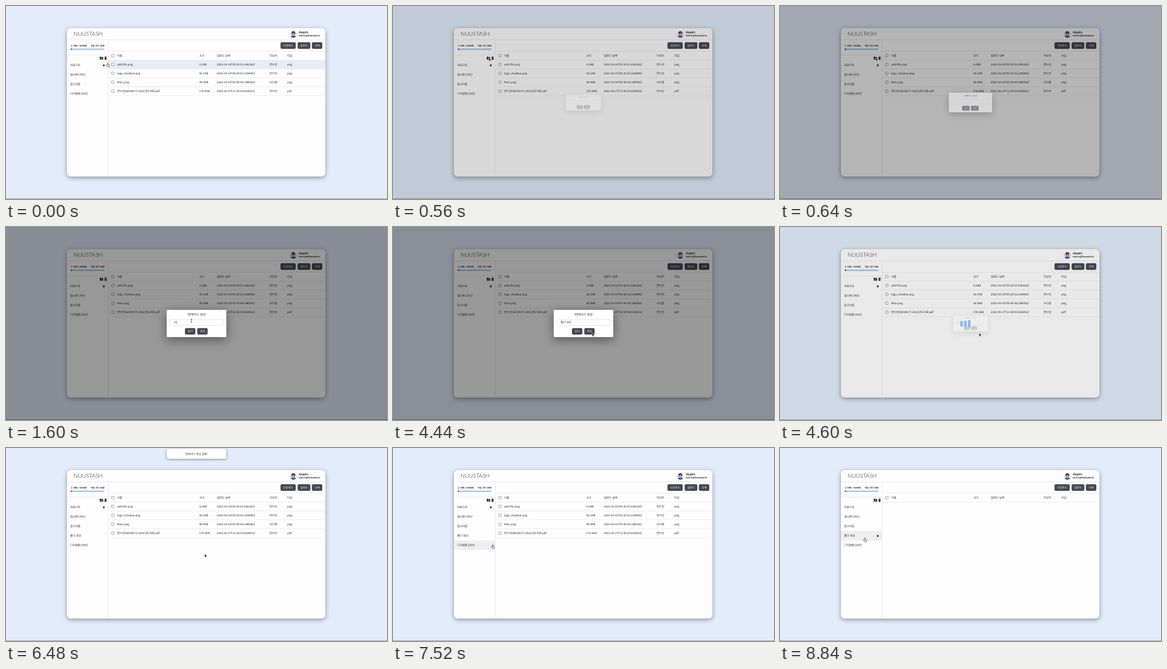
An HTML page that plays this animation: 600x305 px, repeating every 9240 ms.

```html
<!DOCTYPE html>
<html lang="ko">
<head>
<meta charset="utf-8">
<title>Cloud storage</title>
<style>
html, body { margin: 0; height: 100%; overflow: hidden; background: #e2ecfb; }
svg { display: block; width: 100vw; height: 100vh; }
text { font-family: "Noto Sans CJK KR", "Noto Sans", sans-serif; fill: #222; text-rendering: geometricPrecision; white-space: pre; }
.mid { text-anchor: middle; }
.end { text-anchor: end; }
.bold { font-weight: 700; }
.white { fill: #fff; }
.logo { font-family: Lato, sans-serif; font-weight: 300; }
.card { filter: drop-shadow(0 2px 3.5px rgba(0, 0, 0, .38)); }
.modal { filter: drop-shadow(0 4px 8px rgba(0, 0, 0, .45)); }
.toast { filter: drop-shadow(0 1px 2px rgba(0, 0, 0, .4)); }
</style>
</head>
<body>
<svg id="stage" viewBox="0 0 600 305" preserveAspectRatio="none"></svg>
<script>
const LOOP = 9240, DARK = '#474753', LINE = '#e3e4e8';
const stage = document.getElementById('stage');

// Markup helpers; text is placed by its vertical centre.
const box = (x, y, w, h, fill, r = 0, more = '') =>
  `<rect x="${x}" y="${y}" width="${w}" height="${h}" rx="${r}" fill="${fill}" ${more}/>`;
const label = (x, cy, size, str, cls = '', more = '') =>
  `<text x="${x}" y="${cy + size * .36}" font-size="${size}" class="${cls}" ${more}>${str}</text>`;
const button = (x, y, w, h, str) =>
  box(x, y, w, h, DARK, 2) + label(x + w / 2, y + h / 2, 4.2, str, 'mid white');
const group = (id, inner, more = '') => `<g id="${id}" ${more}>${inner}</g>`;
const path = (d, fill, more = '') => `<path d="${d}" fill="${fill}" ${more}/>`;

const columns = [175, 304.5, 332, 415, 443];
const checkbox = y => box(166.3, y - 2, 4, 4, '#fff', .6, 'stroke="#777" stroke-width=".6"');
const cells = (y, row) => checkbox(y) + row.map((s, i) => label(columns[i], y, 4.35, s)).join('');
const files = [
  ['add-file.png', '6.2KB', '2022-03-16T05:20:51.656162Z', '한누빈', 'png'],
  ['logo_shadow.png', '82.1KB', '2022-03-16T05:20:52.224895Z', '한누빈', 'png'],
  ['Main.png', '80.9KB', '2022-03-16T05:40:48.188592Z', '오다결', 'png'],
  ['한누빈(8203417)-2021년도자료.pdf', '176.5KB', '2022-06-27T11:58:50.663851Z', '한누빈', 'pdf']
];
const fileRows = files.map((f, i) =>
  cells(92.3 + 14.1 * i, f) + box(161, 99.3 + 14.1 * i, 342, .6, LINE)).join('');

const avatar = '<clipPath id="round"><circle cx="452.5" cy="44.5" r="5.7"/></clipPath>' +
  '<g clip-path="url(#round)">' + box(446, 38, 13, 13, '#e4e5ef') +
  '<ellipse cx="452.5" cy="50" rx="4.4" ry="3.4" fill="#3c5fb0"/>' +
  '<circle cx="452.5" cy="43" r="2.9" fill="#33283a"/>' +
  '<circle cx="452.5" cy="44.2" r="2" fill="#e39a72"/></g>';

const card =
  box(96, 35, 407, 234.5, '#fdfdfe', 6, 'class="card"') +
  label(106.5, 44.2, 8.8, 'NUUSTASH', 'logo') + avatar +
  label(461, 41.3, 4.4, 'dapple', 'bold') +
  label(461, 46.8, 3.5, 'tobrin@Example.kr', 'bold') +
  box(96, 53, 407, .7, LINE) + box(160.6, 53, .7, 216.5, LINE) +
  box(96, 77, 65, .6, LINE) + box(161, 71, 342, .6, LINE) + box(161, 85.2, 342, .6, LINE) +
  label(102.3, 62.5, 3.4, '2.7MB / 400MB', 'bold') +
  label(155, 62.5, 3.4, '여유 397.3MB', 'bold end') +
  box(102, 67.3, 53, 2.3, '#a3c8ee', 1.1) + box(102, 67.3, 2, 2.3, '#3f4a60', 1) +
  button(432.3, 57.3, 24, 10.4, '다운로드') + button(459.3, 57.3, 20, 10.4, '업로드') +
  button(481.7, 57.3, 16.4, 10.4, '삭제') +
  path('M147.6 80h2l.7.8h2.8v4h-5.5z', '#333') + path('M150.4 82.2v1.8m-.9-.9h1.8', 'none', 'stroke="#fff" stroke-width=".5"') +
  path('M155 80.2h1l.3-.5h1l.3.5h1v.7h-3.6zM155.3 81.3h3v3.6h-3z', '#333') +
  group('rowHover', box(161, 85.8, 342, 13.5, '#e7ecf6')) +
  cells(78.4, ['이름', '크기', '업로드 날짜', '작성자', '타입']) +
  group('files', fileRows) +
  box(96, 131.2, 65, 15, '#efeff2', 0, 'id="sideHover"') +
  ['자료구조', '캡스톤디자인', '알고리즘'].map((s, i) => label(101, 93.7 + 15 * i, 4.35, s)).join('') +
  group('newFolder', label(101, 138.7, 4.35, '폴더 생성')) +
  group('lastFolder', label(101, 138.7, 4.35, '디지털통신보안')) +
  group('gear', '<circle r="1.2" fill="#333"/><circle r="1.5" fill="none" stroke="#333" stroke-width=".7" stroke-dasharray=".7 .48"/>');

const modal = box(253, 131, 94, 43, '#fff', 1.5, 'class="modal"') +
  label(300, 138, 4.9, '컨테이너 생성', 'mid') +
  box(258, 146, 84, 9.6, '#fff', .8, 'stroke="#d5d5da" stroke-width=".6"') +
  label(264, 150.8, 4.2, '', '', 'id="typed"') +
  box(0, 148.6, .5, 4.6, '#222', 0, 'id="caret"') +
  button(281.8, 159.8, 16.4, 10.2, '닫기') + button(301.2, 159.8, 16.4, 10.2, '생성');

const edge = 'stroke="#fff" stroke-width=".5" stroke-linejoin="round"';
const cursors =
  group('arrow', path('M0 0v5.2l1.2-1.1.8 1.8.9-.4-.8-1.7h1.7z', '#000', edge)) +
  group('hand', path('M-.6.4q.6-.8 1.2 0v2l2 .5q.6.2.5.9l-.5 2h-3.1l-1.7-2.1q.1-.8.9-.4l.7.5z', '#fff', 'stroke="#111" stroke-width=".55" stroke-linejoin="round"')) +
  group('beam', path('M-1-2.6q1 0 1 .6 0-.6 1-.6M0-2v4M-1 2.6q1 0 1-.6 0 .6 1 .6', 'none', 'stroke="#111" stroke-width=".6"'));

stage.innerHTML = box(0, 0, 600, 305, '#e2ecfb') + box(0, 304, 600, 1, '#a4a8b0') + card +
  box(0, 0, 600, 305, '#000', 0, 'id="shade"') + group('modal', modal) +
  group('loader', [284, 290, 296].map(x => box(x, 145, 4, 16, '#8ab8e8')).join('')) +
  group('toast', box(253, 1, 94, 16, '#fff', 4, 'class="toast"') + label(300, 9, 4.3, '컨테이너 생성 완료!', 'mid')) +
  group('cursor', cursors);

const el = {};
stage.querySelectorAll('[id]').forEach(n => el[n.id] = n);
const bars = [...el.loader.children];

const ramp = (t, a, b) => Math.min(1, Math.max(0, (t - a) / (b - a)));
const smooth = k => k * k * (3 - 2 * k);
const easeOut = k => 1 - (1 - k) ** 2;
const show = (id, on) => el[id].style.display = on ? '' : 'none';
const move = (id, x, y) => el[id].setAttribute('transform', `translate(${x} ${y})`);

// Pointer stops: time, x, y
const stops = [[40, 160, 90], [240, 151, 82], [700, 151, 82], [1400, 292, 148], [3880, 292, 148],
  [4200, 313.6, 167.5], [6440, 313.6, 167.5], [7440, 164, 156], [7700, 133.6, 142]];
function pointer(t) {
  let [, x, y] = stops[0];
  for (let i = 1; i < stops.length; i++) {
    const [a] = stops[i - 1], [b, nx, ny] = stops[i], k = smooth(ramp(t, a, b));
    x += (nx - x) * k;
    y += (ny - y) * k;
  }
  return [x, y];
}

// Syllables as they compose in the input
const keys = [[1400, ''], [1560, 'ㅍ'], [1840, '포'], [2040, '폴'], [2240, '폴ㄷ'], [2480, '폴더'], [2720, '폴더 '],
  [2840, '폴더 ㅅ'], [3000, '폴더 새'], [3120, '폴더 생'], [3280, '폴더 생ㅅ'], [3440, '폴더 생서'], [3600, '폴더 생성']];

function drawModal(t) {
  const opening = t < 2000;
  const k = opening ? ramp(t, 500, 800) : 1 - ramp(t, 4440, 4640);
  el.shade.setAttribute('opacity', .4 * (opening ? easeOut(k) : k));
  show('modal', k > 0);
  el.modal.setAttribute('opacity', k);
  el.modal.setAttribute('transform', `translate(300 152.5) scale(${.48 + .52 * k}) translate(-300 -152.5)`);

  const [since, str] = keys.findLast(([at]) => t >= at) || [t, ''];
  el.typed.textContent = str;
  el.caret.setAttribute('x', 264.3 + [...str].reduce((w, c) => w + (c === ' ' ? .95 : 3.86), 0));
  show('caret', t >= 1400 && (t - since) % 1000 < 500);
}

function drawLoader(t) {
  show('loader', t >= 4450 && t < 6120);
  bars.forEach((bar, i) => {
    const phase = (t - 4450 + 240 - 120 * i + 1200) % 1200 / 600;
    const h = 16 - 8 * (1 - (1 - Math.sqrt(Math.min(1, phase))) ** 1.38);
    bar.setAttribute('y', 153 - h / 2);
    bar.setAttribute('height', h);
  });
}

function drawCursor(t) {
  const [x, y] = pointer(t);
  const inInput = t > 1000 && t < 4300 && x > 258 && y > 146 && y < 156;
  const onSide = t > 7400 && x < 161;
  const kind = inInput ? 'beam' : t < 520 || onSide ? 'hand' : 'arrow';
  for (const id of ['arrow', 'hand', 'beam']) show(id, id === kind);
  move('cursor', x, y);
  show('sideHover', onSide);
  el.sideHover.setAttribute('y', y > 146.2 ? 146.2 : 131.2);
}

function draw(t) {
  const added = t >= 6120, opened = t >= 7800;
  el.rowHover.setAttribute('opacity', 1 - ramp(t, 40, 200));
  show('files', !opened);
  show('newFolder', added);
  move('lastFolder', 0, added ? 15 : 0);
  move('gear', 154, opened ? 138.9 : 93.8);
  drawModal(t);
  drawLoader(t);
  const drop = easeOut(ramp(t, 5080, 5400)) - smooth(ramp(t, 7080, 7380));
  show('toast', drop > 0);
  move('toast', 0, -24 * (1 - drop));
  drawCursor(t);
}

const start = performance.now();
function tick() {
  draw((performance.now() - start) % LOOP);
  requestAnimationFrame(tick);
}
tick();
</script>
</body>
</html>
```
